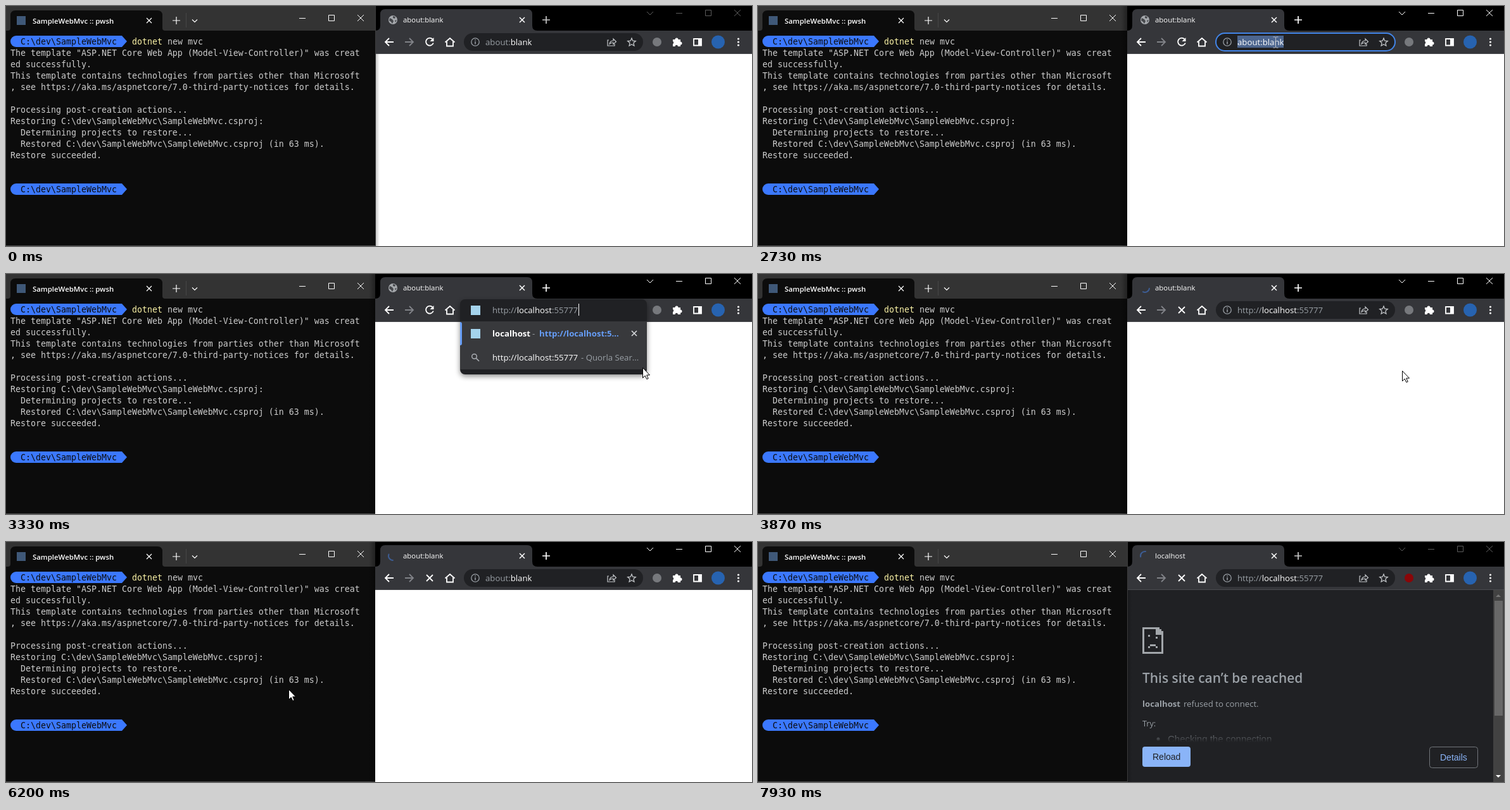
An HTML page that plays this animation: 1178 px wide and 380 px high, repeating every 8 s.

```html
<!DOCTYPE html>
<html lang="en">
<head>
<meta charset="utf-8">
<title>Terminal and browser</title>
<style>
html, body { margin: 0; width: 100%; height: 100%; overflow: hidden; background: #000; }
svg { display: block; width: 1178px; height: 380px; }
text { white-space: pre; }
.mono { font: 13.29px "DejaVu Sans Mono", monospace; fill: #ccc; }
.ui { font: 13.2px "Open Sans", "Noto Sans", sans-serif; fill: #9aa0a6; }
.tab { font: 11.4px "Open Sans", "Noto Sans", sans-serif; fill: #fff; }
.arial { font: 14px "Liberation Sans", Arial, sans-serif; }
.b { font-weight: 700; }
.w { fill: #fff; }
.line { fill: none; stroke: #fff; }
</style>
</head>
<body>
<svg viewBox="0 0 1178 380" xmlns="http://www.w3.org/2000/svg">
  <defs>
    <linearGradient id="shadeLeft"><stop offset="0" stop-color="#000" stop-opacity="0"/><stop offset="1" stop-color="#000" stop-opacity=".35"/></linearGradient>
    <linearGradient id="shadeRight"><stop offset="0" stop-color="#000" stop-opacity=".22"/><stop offset="1" stop-color="#000" stop-opacity="0"/></linearGradient>
    <linearGradient id="fade" x2="0" y2="1"><stop offset="0" stop-color="#202124" stop-opacity="0"/><stop offset=".95" stop-color="#202124"/></linearGradient>
    <filter id="soft" x="-10%" y="-20%" width="120%" height="150%"><feGaussianBlur stdDeviation="4"/></filter>
    <path id="cross" d="M-4 -4 4 4M4 -4-4 4"/>
    <g id="caption" fill="none"><path d="M0 5.5H10M46.5 .5H55.5V9.5H46.5ZM92 0 102 10M102 0 92 10"/></g>
  </defs>

  <!-- browser -->
  <rect x="583" width="595" height="380" fill="#fff"/>
  <rect x="583" width="595" height="39" fill="#000"/>
  <rect x="583" y="39" width="595" height="37" fill="#35363a"/>
  <path d="M583 39Q591 39 591 31V13Q591 5 599 5H823Q831 5 831 13V31Q831 39 839 39Z" fill="#35363a"/>
  <g id="globe">
    <circle r="7" fill="#a5a8ac"/>
    <path d="M-5 -3 -1 -1 1 2 -1 6 -3 3 -6 1ZM0 -6 4 -5 3 -2 0 -3ZM3 1 6 0 4 4Z" fill="#45474b"/>
  </g>
  <path id="spinner" fill="none" stroke="#3d5d94" stroke-width="2" stroke-linecap="round"/>
  <text id="tabTitle" class="tab" x="627" y="26"></text>
  <use href="#cross" class="line" x="815" y="22" stroke-width="1.5"/>
  <path id="plus" d="M847 22H859M853 16V28" stroke-width="1.7"/>
  <g id="winButtons"><use href="#caption" x="1058" y="6"/><path d="M1012 9 1017 14 1022 9" fill="none"/></g>

  <!-- toolbar -->
  <path class="line" stroke-width="1.8" d="M612 57H599M605 51 599 57 605 63"/>
  <path class="line" style="stroke:#818388" stroke-width="1.8" d="M630 57H643M637 51 643 57 637 63"/>
  <g id="reload"><path class="line" stroke-width="1.8" d="M673.6 52.6A6 6 0 1 0 674.8 58.5"/><path class="w" d="M675.5 50V56H669.5Z"/></g>
  <path id="stop" class="line" stroke-width="1.8" d="M664 52 674 62M674 52 664 62"/>
  <path class="line" stroke-width="1.8" d="M693.5 57.5 701 51 708.500 57.500M696 56V63.5H706V56"/>
  <rect x="723" y="43" width="283" height="28" rx="14" fill="#202124"/>
  <rect id="ring" x="723" y="43" width="283" height="28" rx="14" fill="none" stroke="#4285e8" stroke-width="2"/>
  <g fill="none" stroke="#9aa0a6">
    <circle cx="741" cy="57" r="6.200" stroke-width="1.300"/>
    <path d="M741 56V60.500M741 53V54.500" stroke-width="1.500"/>
    <path d="M952 54H950V63H961V60M953 60Q954 55 959 55V52L963.500 56.500 959 60.500V58Q955 58 953 60Z" stroke="#c4c7ca" stroke-width="1.200"/>
    <path d="M988 51 989.800 55.200 994.300 55.600 990.900 58.600 991.900 63 988 60.700 984.100 63 985.100 58.600 981.700 55.600 986.200 55.200Z" stroke="#c4c7ca" stroke-width="1.300"/>
  </g>
  <rect id="selection" x="757" y="47" width="73" height="19" fill="#4d668f"/>
  <text id="address" class="ui" x="757" y="62"><tspan></tspan><tspan class="w"></tspan><tspan></tspan></text>
  <circle id="badge" cx="1028" cy="57" r="7"/>
  <path class="w" d="M1053 53H1056.500A2.500 2.500 0 1 1 1061.500 53H1065V56.500A2.500 2.500 0 1 1 1065 61.500V64H1061A2.200 2.200 0 0 0 1056.600 64H1053V60A2.200 2.200 0 0 0 1053 56Z"/>
  <path class="line" stroke-width="1.800" d="M1086 52H1098V62.500H1086Z"/><rect class="w" x="1093" y="52" width="5" height="10"/>
  <circle cx="1124.500" cy="57" r="10.500" fill="#2763b0"/>
  <g class="w"><circle cx="1156.500" cy="52" r="1.600"/><circle cx="1156.500" cy="57" r="1.600"/><circle cx="1156.500" cy="62" r="1.600"/></g>
  <rect x="583" y="75" width="595" height="1" fill="#4a4b4f"/>

  <!-- error page -->
  <g id="errorPage">
    <rect x="583" y="76" width="595" height="304" fill="#202124"/>
    <g fill="#a2a6aa">
      <path fill-rule="evenodd" d="M607 135H634V138H637V141H640V177H607ZM610 138V174H637V147H628V138Z"/>
      <path d="M631 138H634V141H637V144H631ZM616 147H619V150H616ZM628 150H631V153H628ZM619 162H628V165H619ZM616 165H619V168H616ZM628 165H631V168H628Z"/>
    </g>
    <text class="ui" x="607" y="223" style="font-size:20.900px;font-weight:600">This site can’t be reached</text>
    <text class="ui b" x="607" y="261">localhost</text>
    <text class="ui" x="672" y="261">refused to connect.</text>
    <text class="ui" x="607" y="292" style="font-size:12.600px">Try:</text>
    <circle cx="632" cy="312" r="2.500" fill="#9aa0a6"/>
    <text class="arial" x="647" y="317" style="font-size:15px" fill="#9aa0a6">Checking the connection</text>
    <rect x="607" y="298" width="530" height="20" fill="url(#fade)"/>
    <rect x="607" y="318" width="530" height="6" fill="#202124"/>
    <rect x="607" y="324" width="76" height="32" rx="4" fill="#8ab4f8"/>
    <text class="arial" x="623" y="345" fill="#202124">Reload</text>
    <rect x="1060.500" y="324.500" width="76" height="33" rx="4" fill="none" stroke="#72767b"/>
    <text class="arial" x="1077" y="346" fill="#8ab4f8">Details</text>
    <rect x="1161" y="76" width="17" height="304" fill="#424242"/>
    <rect x="1163" y="93" width="13" height="182" fill="#686868"/>
    <path d="M1165 87H1173L1169 83Z" fill="#777"/>
    <path d="M1165 369H1173L1169 373Z" fill="#fff"/>
  </g>

  <!-- suggestions -->
  <g id="popup">
    <rect x="717" y="44" width="295" height="118" rx="8" fill="#000" opacity=".45" filter="url(#soft)"/>
    <rect x="717" y="40" width="295" height="119" rx="8" fill="#202124"/>
    <rect x="717" y="75" width="295" height="76" fill="#38393c"/>
    <path d="M717 76Q720 76 720 79V110Q720 113 717 113Z" fill="#669df6"/>
    <path d="M734 50H749V65H734ZM734 87H749V102H734Z" fill="#a4d3ec"/>
    <text class="ui" x="768" y="62">http://<tspan class="w">localhost</tspan>:55777</text>
    <rect id="caret" x="904" y="47" width="1" height="19" fill="#fff"/>
    <text class="ui b w" x="768" y="99">localhost</text>
    <text class="ui" x="831" y="99">-</text>
    <text class="ui b" x="842" y="99" style="fill:#669df6">http://localhost:5...</text>
    <use href="#cross" class="line" style="stroke:#d5d7da" x="992" y="94" stroke-width="1.700"/>
    <circle cx="739.500" cy="130.500" r="3.800" fill="none" stroke="#a9adb2" stroke-width="1.500"/>
    <path d="M742.500 133.500 747 138" stroke="#a9adb2" stroke-width="1.700"/>
    <text class="ui w" x="768" y="137">http://localhost:55777</text>
    <text class="ui" x="908" y="137">- Quorla Sear...</text>
  </g>

  <!-- terminal -->
  <rect width="583" height="380" fill="#0c0c0c"/>
  <rect width="583" height="39" fill="#333"/>
  <path d="M3 39Q7 39 7 35V15Q7 7 15 7H239Q247 7 247 15V35Q247 39 251 39Z" fill="#0c0c0c"/>
  <rect x="17" y="16" width="14" height="14" fill="#3f5878"/>
  <text class="tab" x="42" y="28" style="font-weight:600">SampleWebMvc :: pwsh</text>
  <use href="#cross" class="line" x="226" y="23" stroke-width="1.200"/>
  <path class="line" d="M263 23H275M269 17V29" stroke-width="1.200"/>
  <path d="M284.500 11V34" stroke="#474747"/>
  <path class="line" d="M294 21.500 298 25.500 302 21.500" stroke-width="1.200"/>
  <use href="#caption" x="463" y="14" stroke="#fff"/>
  <g id="console"></g>
  <rect y="379" width="583" height="1" fill="#484848"/>

  <g id="activeEdge"><rect x="573" width="10" height="380" fill="url(#shadeLeft)"/></g>
  <g id="idleEdge"><rect x="583" width="1" height="380" fill="#3b3b3b"/><rect x="584" y="76" width="6" height="304" fill="url(#shadeRight)"/></g>

  <!-- pointers -->
  <path id="arrow" d="M.5 .5V16.500L4.200 13 6.800 18.500 9.200 17.500 6.700 12H11.500Z" fill="#fff" stroke="#000"/>
  <path id="beam" d="M-4 -8.500H-1L0 -7.500 1 -8.500H4M0 -7.500V7.500M-4 8.500H-1L0 7.500 1 8.500H4" fill="none" stroke="#b9bcc2"/>
  <path id="resize" d="M1170.500 370.500 1174.500 366.500V369.500H1180V371.500H1174.500V374.500Z" fill="#fff" stroke="#000"/>
</svg>
<script>
const LOOP = 8000, STEP = 200 / 3;
const $ = id => document.getElementById(id);
const show = (id, on) => { $(id).style.display = on ? '' : 'none'; };
const within = (t, a, b) => t >= a && t < b;

// Terminal contents
const path = 'C:\\dev\\SampleWebMvc';
const output = [
  'The template "ASP.NET Core Web App (Model-View-Controller)" was creat',
  'ed successfully.',
  'This template contains technologies from parties other than Microsoft',
  ', see https://aka.ms/aspnetcore/7.0-third-party-notices for details.',
  '',
  'Processing post-creation actions...',
  `Restoring ${path}\\SampleWebMvc.csproj:`,
  '  Determining projects to restore...',
  `  Restored ${path}\\SampleWebMvc.csproj (in 63 ms).`,
  'Restore succeeded.'
];
const mono = (x, row, s, fill = '#ccc') =>
  `<text class="mono" x="${x}" y="${61 + row * 18}" style="fill:${fill}">${s}</text>`;
const prompt = row => {
  const y = 47 + row * 18;
  return `<path d="M16 ${y}H183L191 ${y + 9} 183 ${y + 18}H16A9 9 0 0 1 16 ${y}Z" fill="#3b78ff"/>` +
    mono(23, row, path, '#0c0c0c');
};
$('console').innerHTML = prompt(0) + mono(199, 0, 'dotnet', '#f9f1a5') + mono(255, 0, 'new mvc') +
  output.map((s, i) => mono(7, i + 1, s)).join('') + prompt(13);

// Pointer path: time, x, y
const track = [
  [1860, 1178, 190], [2330, 817, 57], [2800, 817, 57], [3330, 1005, 148], [3400, 1016, 153],
  [3530, 1016, 153], [3600, 1017, 153], [3870, 1017, 153], [4300, 1056, 154], [4800, 1050, 153],
  [5130, 1050, 153], [5530, 523, 196], [5860, 446, 233], [6460, 446, 233], [6667, 1107, 217]
];
function pointerAt(t) {
  const i = track.findIndex(k => k[0] >= t);
  if (i < 1) return track[i < 0 ? track.length - 1 : 0].slice(1);
  const [t0, x0, y0] = track[i - 1], [t1, x1, y1] = track[i];
  const u = (t - t0) / (t1 - t0), e = u * u * (3 - 2 * u);
  return [Math.round(x0 + (x1 - x0) * e), Math.round(y0 + (y1 - y0) * e)];
}

function arc(mid) {
  const point = deg => {
    const a = deg * Math.PI / 180;
    return `${611 + 7 * Math.cos(a)} ${22 + 7 * Math.sin(a)}`;
  };
  return `M${point(mid - 55)}A7 7 0 0 1 ${point(mid + 55)}`;
}

const CLICK = 2400, PASTE = 2860, ENTER = 3860, REVERT = 6125, FAIL = 6260, RETRY = 7195, BLUR = 7595;

function render(t) {
  const active = within(t, CLICK, BLUR), failed = t >= FAIL;
  const popup = within(t, PASTE, ENTER);
  const loading = within(t, ENTER, FAIL) || t >= RETRY;
  const blank = t < ENTER || within(t, REVERT, FAIL);
  const focused = within(t, CLICK, PASTE);

  $('tabTitle').textContent = failed ? 'localhost' : 'about:blank';
  const parts = blank ? ['about:', 'blank', ''] : ['http://', 'localhost', ':55777'];
  [...$('address').children].forEach((el, i) => { el.textContent = parts[i]; });
  $('address').firstElementChild.style.fill = focused ? '#fff' : '';

  show('ring', focused);
  show('selection', focused);
  show('popup', popup);
  show('caret', t < 3725);
  show('errorPage', failed);
  show('reload', !loading);
  show('stop', loading);
  show('globe', !loading);
  show('spinner', loading);
  $('globe').setAttribute('transform', `translate(611 22) scale(${failed ? 0.7 : 1})`);
  if (loading) {
    const start = failed ? RETRY : ENTER;
    $('spinner').setAttribute('d', arc(64 - (t - start) * 360 / 1320));
  }
  $('badge').setAttribute('fill', failed ? '#8a0608' : '#77797d');
  $('winButtons').setAttribute('stroke', active ? '#fff' : '#5c5c5c');
  $('plus').setAttribute('stroke', active ? '#fff' : '#c8c8c8');
  show('activeEdge', active);
  show('idleEdge', !active);

  const [x, y] = pointerAt(t);
  const visible = within(t, 1925, 6725);
  const overText = x > 722 && x < 1007 && y > 42 && y < 72;
  show('arrow', visible && !overText);
  show('beam', visible && overText);
  show('resize', within(t, 60, 130));
  $('arrow').setAttribute('transform', `translate(${x} ${y})`);
  $('beam').setAttribute('transform', `translate(${x + 0.5} ${y + 0.5})`);
}

const begin = performance.now();
function tick() {
  const t = (performance.now() - begin) % LOOP;
  render(Math.floor((t + 5) / STEP) * STEP);
  requestAnimationFrame(tick);
}
tick();
</script>
</body>
</html>
```
